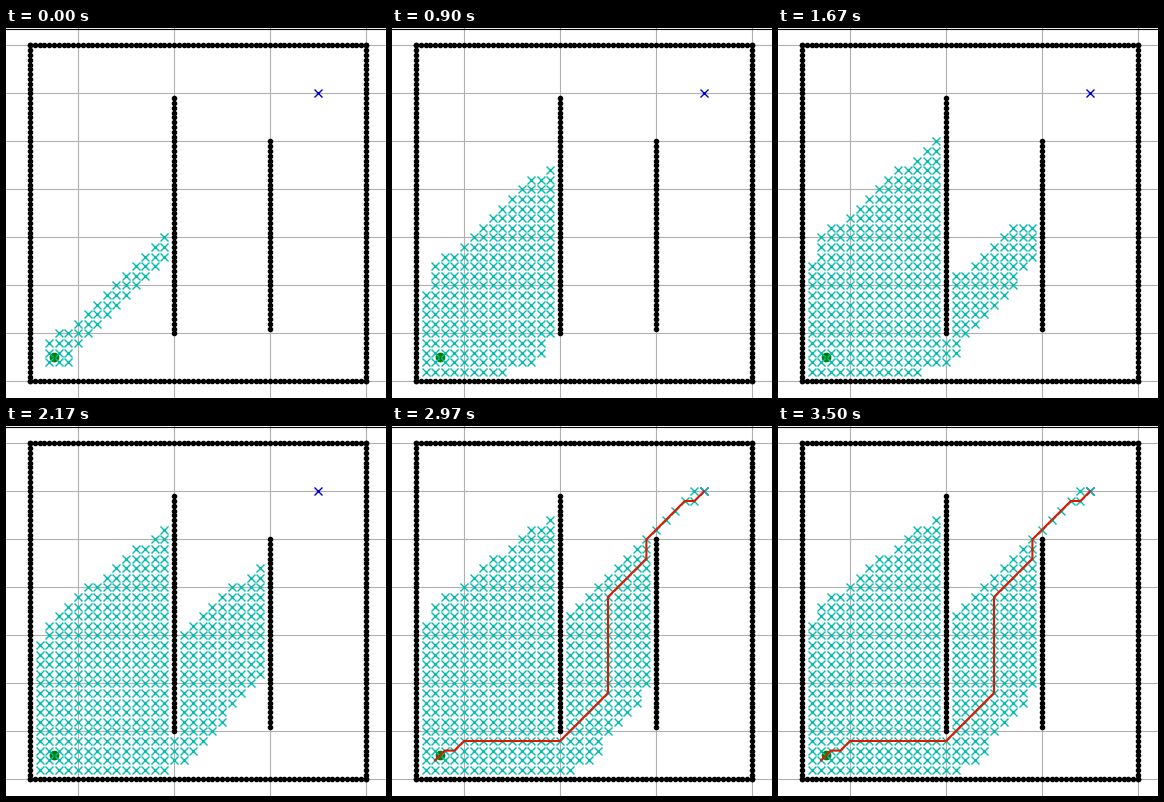
Write a matplotlib script that moves like this. It is 380 px wide and 370 px high and loops after 3.53 s.

```python
import math

import matplotlib.pyplot as plt
import numpy as np
from matplotlib.animation import FuncAnimation

W, H, DPI = 380, 370, 100
LOOP, FRAMES = 3530, 106
PX = 4.8                       # pixels per map unit
LEFT, BOTTOM = -10 - 24 / PX, -10 - 16.6 / PX
RESO, RADIUS, SIZE = 2, 1, 36  # planner grid
START, GOAL = (2, 2), (30, 30)
PATH_FRAME = 76
ROUTE = [(30, 30), (29, 29), (28, 29), (24, 25), (24, 23), (20, 19),
         (20, 9), (15, 4), (5, 4), (4, 3), (3, 3), (2, 2)]


def walls():
    side = range(-10, 61)
    pts = [(i, -10) for i in side] + [(i, 60) for i in side]
    pts += [(-10, i) for i in side] + [(60, i) for i in side]
    pts += [(20, i) for i in range(50)]
    pts += [(40, i) for i in range(1, 41)]
    return np.array(pts)


def to_map(cells):
    return np.array(cells).reshape(-1, 2) * RESO - 10


def blocked_cells(obstacles):
    blocked = set()
    for i in range(SIZE):
        for j in range(SIZE):
            gap = np.hypot(*(obstacles - to_map((i, j))).T)
            if gap.min() <= RADIUS:
                blocked.add((i, j))
    return blocked


def a_star(blocked):
    """Return the cells in the order the search expands them."""
    moves = [(1, 0), (0, 1), (-1, 0), (0, -1),
             (-1, -1), (-1, 1), (1, -1), (1, 1)]
    open_set, closed, order = {START: 0.0}, set(), []

    def score(cell):
        return open_set[cell] + math.hypot(GOAL[0] - cell[0], GOAL[1] - cell[1])

    while open_set:
        cell = min(open_set, key=score)
        order.append(cell)
        if cell == GOAL:
            break
        cost = open_set.pop(cell)
        closed.add(cell)
        for dx, dy in moves:
            near = (cell[0] + dx, cell[1] + dy)
            if near in closed or near in blocked:
                continue
            new_cost = cost + math.hypot(dx, dy)
            if new_cost < open_set.get(near, math.inf):
                open_set[near] = new_cost
    return order


obstacles = walls()
points = to_map(a_star(blocked_cells(obstacles)))

fig = plt.figure(figsize=(W / DPI, H / DPI), dpi=DPI, facecolor="white")
ax = fig.add_axes([0, 0, 1, 1])
ax.set_xlim(LEFT, LEFT + W / PX)
ax.set_ylim(BOTTOM, BOTTOM + H / PX)
ax.axis("off")

for x in range(0, 61, 20):
    ax.axvline(x, color="#b0b0b0", lw=0.8, zorder=0)
for y in range(-10, 61, 10):
    ax.axhline(y, color="#b0b0b0", lw=0.8, zorder=0)
ax.axhline(63.5, color="black", lw=0.8, zorder=1)  # top of the plot frame

ax.plot(*obstacles.T, ".k", zorder=2)
ax.plot(-5, -5, "o", color="#008000", zorder=3)
ax.plot(*to_map(GOAL).T, "x", color="#0000cc", zorder=3)
cells, = ax.plot([], [], "x", color="#04bdb0", zorder=4)
route, = ax.plot(*to_map(ROUTE).T, "-", color="#e01800", lw=1.5, zorder=5)


def expanded(frame):
    """Cells shown: ten per redraw, slowing as the drawing fills up."""
    if frame >= PATH_FRAME:
        return len(points)
    redraws = np.interp(frame, [0, 11, 27, 50, 65, PATH_FRAME],
                        [4.5, 12.5, 22.5, 33.5, 41.5, 46.9])
    return min(10 * int(redraws) + 1, len(points))


def update(frame):
    cells.set_data(*points[:expanded(frame)].T)
    route.set_visible(frame >= PATH_FRAME)
    return cells, route


anim = FuncAnimation(fig, update, frames=FRAMES, interval=LOOP / FRAMES,
                     init_func=lambda: update(0), repeat=True, repeat_delay=0)
plt.show()
```
